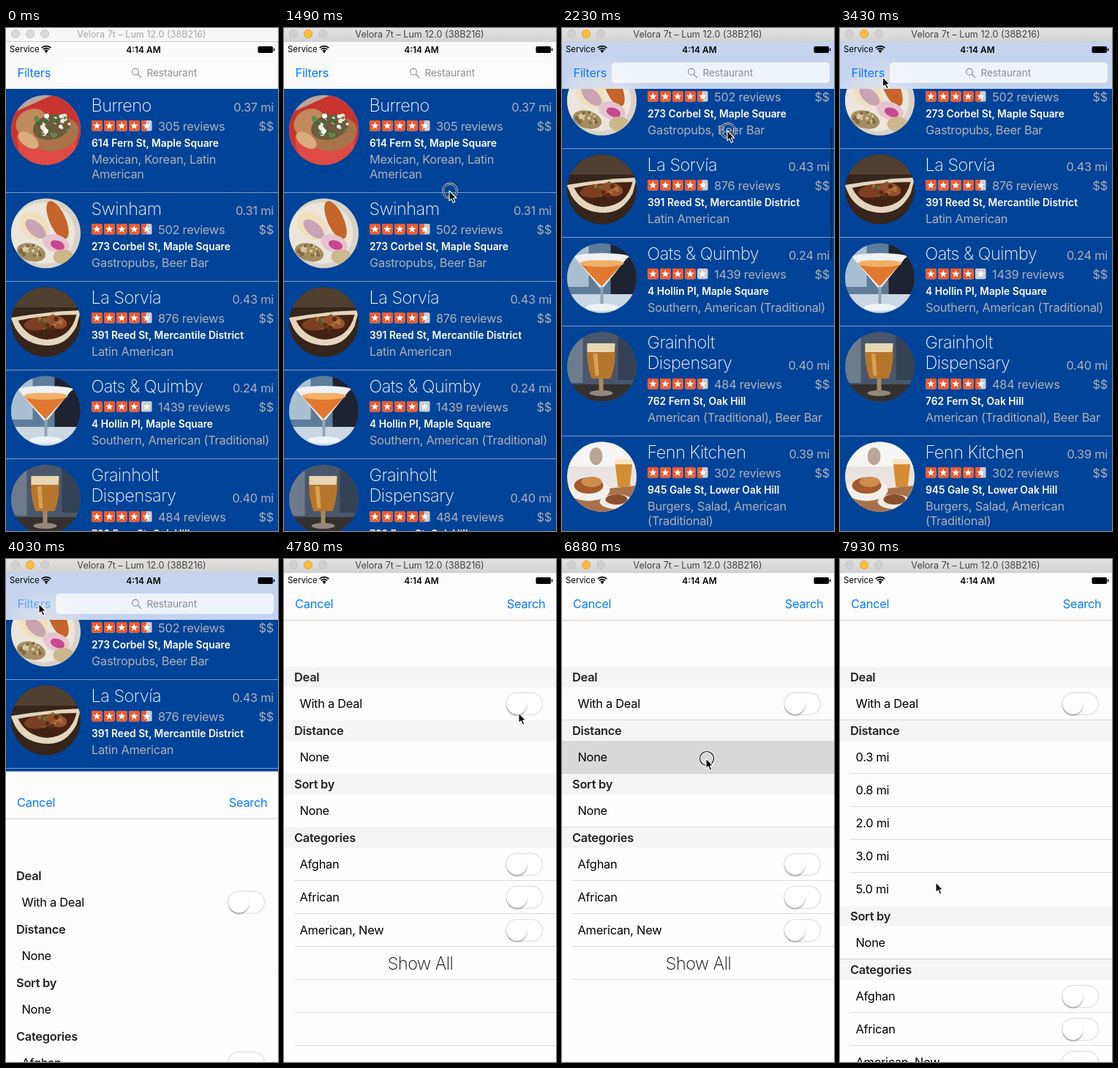
Recreate the animation shown at these times as an HTML page. Size 372x686 px, loop 8 s.

```html
<!DOCTYPE html>
<html lang="en">
<head>
<meta charset="utf-8">
<title>Restaurant finder</title>
<style>
html, body { margin: 0; width: 100%; height: 100%; overflow: hidden; background: #fff; }
svg { display: block; width: 100vw; height: 100vh; }
text { font: 400 16.4px Inter, "Open Sans", sans-serif; letter-spacing: -.27px; white-space: pre; }
.thin { font-size: 23.5px; font-weight: 200; letter-spacing: -.5px; }
.addr { font-size: 13.8px; font-weight: 600; letter-spacing: 0; fill: #fff; }
.head { font-weight: 600; fill: #222; }
.soft { fill: #acb0b6; }
.link { fill: #0a7aff; }
.small { font-size: 11.4px; letter-spacing: 0; }
.bar { font-size: 12.6px; letter-spacing: 0; }
.hint { font-size: 13.6px; letter-spacing: -.05px; fill: #8e8e93; }
.end { text-anchor: end; }
.mid { text-anchor: middle; }
</style>
</head>
<body>
<svg id="stage" viewBox="0 0 372 686" preserveAspectRatio="none"></svg>
<script>
const LOOP = 8000, STEP = 150, NAV_END = 83;

// ---- markup helpers ----
const text = (x, y, s, cls = '', extra = '') =>
  `<text x="${x}" y="${y}" class="${cls}" ${extra}>${s.replace(/&/g, '&amp;')}</text>`;
const box = (x, y, w, h, fill, extra = '') =>
  `<rect x="${x}" y="${y}" width="${w}" height="${h}" fill="${fill}" ${extra}/>`;
const dot = (x, y, r, fill, extra = '') => `<circle cx="${x}" cy="${y}" r="${r}" fill="${fill}" ${extra}/>`;
const oval = (x, y, rx, ry, fill, turn = 0) =>
  `<ellipse cx="${x}" cy="${y}" rx="${rx}" ry="${ry}" fill="${fill}" transform="rotate(${turn} ${x} ${y})"/>`;
const path = (d, fill, extra = '') => `<path d="${d}" fill="${fill}" ${extra}/>`;
const group = (id, body, extra = '') => `<g id="${id}" ${extra}>${body}</g>`;
const line = (y, x = 14, color = '#dcdce0') => box(x, y, 372 - x, 1, color);

function specks(seed, n, cx, cy, spread, colors) {
  let out = '';
  const rand = () => (seed = seed * 16807 % 2147483647) / 2147483647;
  for (let i = 0; i < n; i++) {
    const a = rand() * 6.28, d = Math.sqrt(rand()) * spread;
    out += dot(cx + d * Math.cos(a), cy + d * Math.sin(a) * .7, 1.5 + rand() * 2, colors[i % colors.length]);
  }
  return out;
}

// ---- food pictures, centred on 0,0 ----
const photos = [
  box(-48, -48, 96, 96, '#b9a69b') + path('M-48-22L10-48 48-30V48H-48Z', '#c8342f') +
    path('M-40 8Q0 36 44 4L36 48H-34Z', '#df4a45') + oval(-20, -10, 22, 18, '#c08a5c', -30) +
    oval(14, 6, 32, 22, '#a9744a', -18) + oval(8, -4, 26, 17, '#6e5a3c', -14) +
    specks(7, 34, 8, -8, 25, ['#eee8d4', '#5f8a4a', '#fff', '#44683a']) + oval(-24, 14, 16, 9, '#d9ad7c', 35),
  box(-48, -48, 96, 96, '#d9d2c8') + oval(-4, 0, 44, 42, '#ece5da') + oval(16, -18, 11, 28, '#c5642b', -24) +
    oval(-16, -10, 22, 17, '#f0dfbc', 40) + oval(-14, -6, 17, 9, '#c9a4b4', 42) + oval(14, 14, 19, 12, '#e7c3cf', 20) +
    oval(16, 16, 10, 6, '#c6488d', 20) + oval(-20, 26, 20, 12, '#a58d62', 15) + oval(24, 32, 14, 10, '#cdb78c') +
    specks(23, 16, -20, 24, 15, ['#d9c99f', '#7d6a44']),
  box(-48, -48, 96, 96, '#35251b') + box(-48, -48, 96, 28, '#4f4031') +
    path('M-48-6Q0-14 48-16L42 6Q28 32 4 32Q-28 32-42 8Z', '#e4d5bd') +
    path('M-38-2Q2-10 42-10Q34 22 2 24Q-26 22-38-2Z', '#432214') +
    oval(-8, 2, 22, 9, '#7c3f23', -8) + oval(14, 0, 15, 9, '#93502c', 14) +
    specks(11, 14, 4, -2, 19, ['#5b2a18', '#b0703f', '#5d7038']),
  box(-48, -48, 96, 96, '#5e7d9b') + box(-48, -48, 30, 60, '#a9bfd2') + box(12, -48, 40, 96, '#1d2330') +
    box(-48, 22, 96, 30, '#cbd8e3') + path('M-38-29H36L2 13Q0 16-3 13Z', '#f1ece8') +
    path('M-30-20H29L1 10Q0 12-2 10Z', '#e0792f') + oval(0, -20, 30, 5, '#f2b069') + oval(0, -29, 37, 5, '#eef2f5') +
    box(-2, 12, 4, 27, '#8fa3b5') + oval(0, 40, 22, 5, '#eef3f6'),
  box(-48, -48, 96, 96, '#49566b') + box(-48, -48, 22, 70, '#6d7b8d') + box(22, -48, 30, 66, '#354256') +
    box(-48, 24, 96, 26, '#33302f') + path('M-20-32H18Q20-4 12 16H-14Q-22-4-20-32Z', '#b5762c') +
    path('M-20-32H18L17-20H-20Z', '#e7d6b4') + path('M-12-18H-6L-4 12H-9Z', '#d9a050') +
    box(-4, 16, 6, 18, '#a58a64') + oval(-1, 36, 16, 4, '#92897d'),
  box(-48, -48, 96, 96, '#e9e4df') + box(-48, -48, 96, 34, '#f6f5f3') + path('M-48 22L48 12V48H-48Z', '#a9714a') +
    oval(-18, 18, 29, 15, '#f5f0ea') + oval(-18, 12, 20, 11, '#a35a2c') + oval(-14, 7, 14, 7, '#ce8d4d') +
    oval(20, 34, 23, 10, '#f1ece4') + oval(20, 31, 15, 7, '#8a4f2c') +
    path('M18-20H42L38 14H22Z', '#d48d35') + box(18, -24, 24, 7, '#f6e6c5') + oval(-8, -28, 9, 12, '#b8a696')
];

// ---- restaurant list ----
const rows = [
  { h: 141, name: ['Burreno'], mi: '0.37', n: 305, addr: '614 Fern St, Maple Square', tags: ['Mexican, Korean, Latin', 'American'] },
  { h: 121, name: ['Swinham'], mi: '0.31', n: 502, addr: '273 Corbel St, Maple Square', tags: ['Gastropubs, Beer Bar'] },
  { h: 121, name: ['La Sorvía'], mi: '0.43', n: 876, addr: '391 Reed St, Mercantile District', tags: ['Latin American'] },
  { h: 121, name: ['Oats & Quimby'], mi: '0.24', n: 1439, stars: 4, addr: '4 Hollin Pl, Maple Square', tags: ['Southern, American (Traditional)'] },
  { h: 150, name: ['Grainholt', 'Dispensary'], mi: '0.40', n: 484, addr: '762 Fern St, Oak Hill', tags: ['American (Traditional), Beer Bar'] },
  { h: 141, name: ['Fenn Kitchen'], mi: '0.39', n: 302, addr: '945 Gale St, Lower Oak Hill', tags: ['Burgers, Salad, American', '(Traditional)'] }
];

const starPoints = Array.from({ length: 10 }, (_, i) => {
  const a = i * Math.PI / 5 - Math.PI / 2, r = i % 2 ? 2.3 : 5.6;
  return (7.3 + r * Math.cos(a)).toFixed(2) + ',' + (7.5 + r * Math.sin(a)).toFixed(2);
}).join(' ');

function rating(y, score) {
  let out = '';
  for (let i = 0; i < 5; i++) {
    const part = Math.min(1, Math.max(0, score - i)), x = 117 + i * 17;
    out += `<g transform="translate(${x} ${y})">` + box(0, 0, 14.6, 14.4, '#c9ccd0', 'rx="2"') +
      (part ? box(0, 0, 14.6 * part, 14.4, '#ea5a30', 'rx="2"') : '') +
      `<polygon points="${starPoints}" fill="#fff"/></g>`;
  }
  return out;
}

function restaurant(r, i, y) {
  const drop = (r.name.length - 1) * 29, at = d => y + drop + d;
  return `<g transform="translate(54.5 ${y + 56})"><g clip-path="url(#round)">${photos[i]}</g></g>` +
    r.name.map((s, k) => text(116.5, y + 31 + k * 28, s, 'thin', 'fill="#fff"')).join('') +
    text(366, at(31), r.mi + ' mi', 'soft end') + rating(at(43), r.stars || 4.5) +
    text(208, at(56.5), r.n + ' reviews', 'soft') + text(366, at(56.5), '$$', 'soft end') +
    text(117, at(78.5), r.addr, 'addr') +
    r.tags.map((s, k) => text(117, at(101.5) + k * 20.5, s, 'soft')).join('') +
    box(0, y + r.h, 372, 1, '#7f9dc8');
}

let cells = '', glows = '', rowY = NAV_END;
rows.forEach((r, i) => {
  cells += restaurant(r, i, rowY);
  glows += dot(54.5, rowY + 56, 62, 'url(#glow)');
  rowY += r.h;
});

// ---- filter sheet ----
const header = (y, s) => box(0, y, 372, 28, '#f5f5f5', 'class="band"') + text(14, y + 20, s, 'head');
const option = (y, s) => text(21.5, y + 28, s);
function toggle(y, id) {
  const cy = y + 22.5;
  return box(303.5, cy - 15, 50, 30, '#fff', `rx="15" stroke="#e3e3e3" stroke-width="1.4" id="${id}track"`) +
    group(id + 'knob', dot(318.5, cy + 3, 14, '#000', 'opacity=".13"') +
      dot(318.5, cy + 1.2, 14.6, '#000', 'opacity=".14"') + dot(318.5, cy, 14.2, '#fff'));
}

const lowerPart = box(0, 293, 372, 600, '#fefefe') + header(293, 'Sort by') + option(321, 'None') + header(366, 'Categories') +
  ['Afghan', 'African', 'American, New'].map((s, i) => option(394 + i * 45, s) + toggle(394 + i * 45, 'c' + i)).join('') +
  text(186.5, 560, 'Show All', 'thin mid') +
  group('rules', [438, 483, 528, 573].map(y => line(y)).join('')) +
  group('spare', line(618) + line(663)) + group('edgeLow', line(365, 0));

const sheetBody = box(0, 19, 372, 680, '#fdfdfd') + line(83, 0, '#cfcfd1') +
  text(15, 67, 'Cancel', 'link') + text(357.5, 67, 'Search', 'link end') +
  header(147, 'Deal') + option(175, 'With a Deal') + toggle(175, 'deal') +
  header(220, 'Distance') + box(0, 248, 372, 45, '#d9d9d9', 'id="picked"') +
  group('none', option(248, 'None')) +
  group('miles', ['0.3', '0.8', '2.0', '3.0', '5.0'].map((s, i) =>
    option(248 + i * 45, s + ' mi') + (i < 4 ? line(292 + i * 45) : '')).join('')) +
  group('lower', lowerPart) + group('edgeTop', line(219, 0)) + group('edgeMid', line(292, 0, '#cfcfd1'));

// ---- fixed chrome ----
const wifi = [3, 6, 9].map(r =>
  path(`M${55 - r * .7} ${34 - r * .7}A${r} ${r} 0 0 1 ${55 + r * .7} ${34 - r * .7}`, 'none', 'stroke="#000" stroke-width="1.7"')).join('') +
  dot(55, 33, 1.3, '#000');
const statusBar = text(5, 33.3, 'Service', 'small') + `<g transform="translate(0 -.5)">${wifi}</g>` +
  text(188, 33.5, '4:14 AM', 'small mid', 'style="font-weight:600;font-size:11.9px"') +
  box(344.5, 25, 20.5, 9, '#000', 'rx="1.8"') + box(365.8, 27.6, 1.6, 4, '#000', 'rx=".8"');

const windowBar = box(0, 0, 372, 19, '#f6f6f6', 'id="barBack"') + box(0, 18, 372, 1, '#cfcfcf') +
  [13, 33, 53].map((x, i) => dot(x, 8, 5.6, '#dadada', `stroke="#c3c3c3" stroke-width=".9" id="light${i}"`)).join('') +
  text(185.5, 12.8, 'Velora 7t – Lum 12.0 (38B216)', 'bar mid', 'id="caption"');

document.getElementById('stage').innerHTML = `<defs>
  <clipPath id="round"><circle r="47.5"/></clipPath>
  <clipPath id="navClip"><rect y="19" width="372" height="64"/></clipPath>
  <linearGradient id="tint" gradientUnits="userSpaceOnUse" x1="0" y1="62" x2="0" y2="98">
    <stop offset="0" stop-color="#c5d3ef" stop-opacity="0"/><stop offset="1" stop-color="#c5d3ef"/></linearGradient>
  <linearGradient id="metal" x1="0" y1="0" x2="0" y2="1"><stop offset="0" stop-color="#e2e2e2"/><stop offset="1" stop-color="#d2d2d2"/></linearGradient>
  <radialGradient id="glow"><stop offset="0" stop-color="#e6e3e2" stop-opacity=".85"/><stop offset=".55" stop-color="#e0e2ea" stop-opacity=".6"/>
    <stop offset="1" stop-color="#dfe3ee" stop-opacity="0"/></radialGradient>
</defs>` +
  box(0, 0, 372, 686, '#004398') + group('list', cells) +
  box(367.3, 0, 2.6, 182, '#000', 'rx="1.3" id="thumb"') +
  box(0, 19, 372, 64, '#fafafa') +
  `<g clip-path="url(#navClip)">${group('under', box(0, 62, 372, 900, 'url(#tint)') + glows)}</g>` +
  text(15.5, 67, 'Filters', 'link', 'id="filters"') + box(68, 47, 298, 28, '#fff', 'rx="5" opacity=".72"') +
  dot(177, 59.8, 4.4, 'none', 'stroke="#8e8e93" stroke-width="1.1"') + path('M180.2 63L185 67.8', 'none', 'stroke="#8e8e93" stroke-width="1.2"') +
  text(192.5, 66, 'Restaurant', 'hint') +
  group('sheet', sheetBody) + statusBar + windowBar +
  group('cursor',
    group('ring', dot(1, 0, 9.5, 'none', 'stroke="#fff" stroke-width="2.8" opacity=".8"') + dot(1, 0, 9.5, 'none', 'stroke="#111" stroke-width="1.2"')) +
    path('M0 0V13.6L3.1 10.8 5.4 16.2 7.8 15.1 5.5 10H9.8Z', '#000', 'stroke="#fff" stroke-width="1.1" stroke-linejoin="round"'));

// ---- motion ----
const set = (id, key, value) => document.getElementById(id).setAttribute(key, value);
const move = (id, x, y) => set(id, 'transform', `translate(${x} ${y})`);
const fade = (id, v) => set(id, 'opacity', v);
const ramp = (t, a, b) => Math.min(1, Math.max(0, (t - a) / (b - a)));
const smooth = k => k * k * (3 - 2 * k);
const bands = document.querySelectorAll('.band');

// Cubic Bezier (.38,.7,.125,1): the sheet's quick start and soft landing.
function slide(k) {
  const curve = (s, a, b) => 3 * a * s * (1 - s) ** 2 + 3 * b * s * s * (1 - s) + s ** 3;
  let lo = 0, hi = 1;
  for (let i = 0; i < 24; i++) {
    const m = (lo + hi) / 2;
    if (curve(m, .38, .125) < k) lo = m; else hi = m;
  }
  return curve(lo, .7, 1);
}

// Eased position between [time, x, y] stops.
function follow(stops, t) {
  let a = stops[0];
  for (const b of stops) {
    if (t < b[0]) {
      const k = smooth(ramp(t, a[0], b[0]));
      return a.slice(1).map((v, i) => v + (b[i + 1] - v) * k);
    }
    a = b;
  }
  return a.slice(1);
}

const pointer = [[750, 378, 330], [1350, 226, 222], [1780, 226, 167], [2230, 226, 140], [2680, 226, 140],
  [3580, 45, 61], [4180, 45, 61], [4780, 321, 210], [5230, 336, 198], [6130, 336, 198], [6430, 263, 257],
  [6880, 197, 272], [7030, 197, 272], [7480, 176, 320], [7930, 131, 441]];
const presses = [[1350, 2700], [3560, 3720], [5520, 5700], [5960, 6150], [6860, 7050]];

// The picture refreshes every 150 ms, restarting its beat at 1780.
function sample(t) {
  if (t < 750) return 0;
  const start = t < 1780 ? 750 : 1780;
  return start + STEP * Math.floor((t - start) / STEP);
}

function draw(t) {
  const active = t >= 900;
  set('barBack', 'fill', active ? 'url(#metal)' : '#f6f6f6');
  set('light1', 'fill', active ? '#fdbd3e' : '#dadada');
  set('light1', 'stroke', active ? '#dfa02f' : '#c3c3c3');
  for (const i of [0, 2]) set('light' + i, 'fill', active ? '#d0d0d0' : '#dadada');
  set('caption', 'fill', active ? '#444' : '#ababab');

  const offset = t < 1780 ? 55 * ramp(t, 1350, 1780) : 55 + 126 * (1 - (1 - ramp(t, 1780, 2230)) ** 1.6);
  move('list', 0, -offset);
  move('under', 0, -offset);
  fade('under', ramp(offset, 0, 25));
  set('thumb', 'y', 85 + offset * .278);
  fade('thumb', t > 1350 ? .38 * (1 - ramp(t, 2700, 3100)) : 0);
  fade('filters', t >= 3560 ? .55 : 1);

  move('sheet', 0, 667 * (1 - slide(ramp(t, 3909, 4409))));
  const settled = t > 4100 ? 1 : 0;
  bands.forEach(b => b.setAttribute('opacity', settled));
  fade('rules', settled);

  const on = smooth(ramp(t, 5460, 5700)) - smooth(ramp(t, 5920, 6150));
  move('dealknob', 20 * on, 0);
  set('dealtrack', 'fill', on > .3 ? '#4cd964' : '#fff');
  set('dealtrack', 'stroke', on > .3 ? '#4cd964' : '#e3e3e3');

  const picked = t >= 6860 ? 1 : 0, opened = smooth(ramp(t, 7000, 7330));
  fade('spare', settled && t < 6580 ? 1 : 0);
  for (const id of ['edgeTop', 'edgeLow']) fade(id, picked);
  for (const id of ['edgeMid', 'picked']) fade(id, picked * (1 - opened));
  fade('none', 1 - opened);
  fade('miles', opened);
  move('lower', 0, 180 * opened);

  move('cursor', ...follow(pointer, t));
  fade('cursor', active ? 1 : 0);
  fade('ring', presses.some(([a, b]) => t >= a && t < b) ? 1 : 0);
}

const begin = performance.now();
function tick() {
  draw(sample((performance.now() - begin) % LOOP));
  requestAnimationFrame(tick);
}
tick();
</script>
</body>
</html>
```
